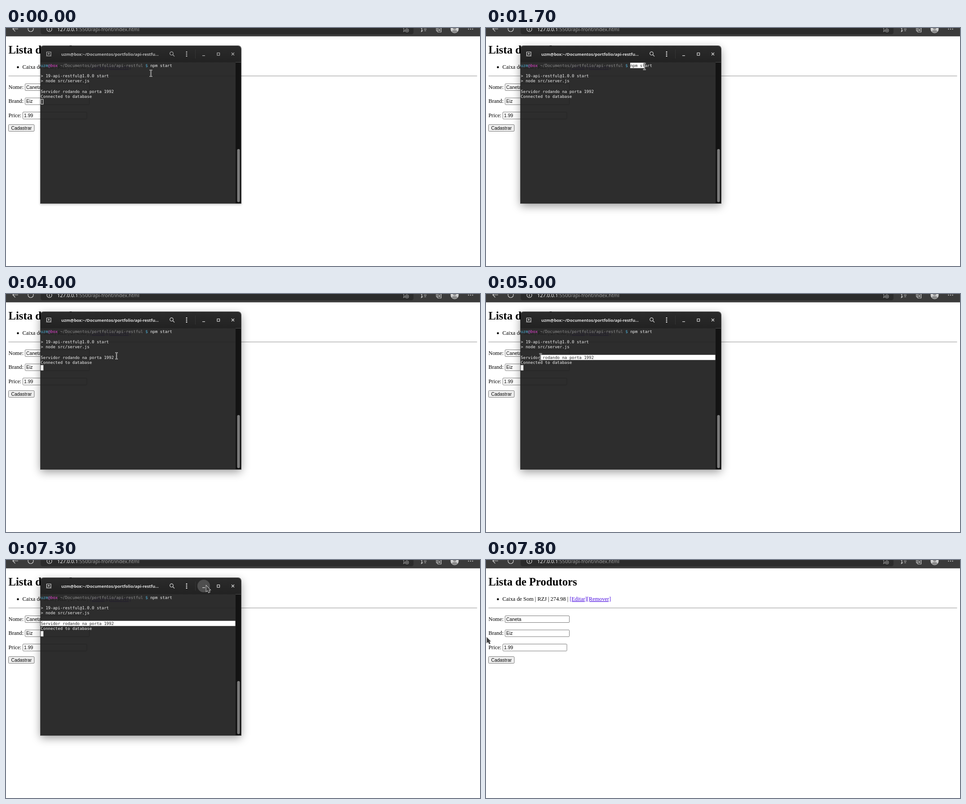
Animation, 1055 px wide and 531 px high, one loop 8000 ms. Source, as an HTML page:

```html
<!DOCTYPE html>
<html lang="pt">
<head>
<meta charset="utf-8">
<title>Terminal</title>
<style>
  html, body { margin: 0; width: 100%; height: 100%; overflow: hidden; background: #fff; }
  svg { display: block; position: absolute; left: 0; top: 0; }
  text { white-space: pre; }
  #stage { position: relative; width: 1055px; height: 531px; overflow: hidden; }
  .serif { font: 12.35px "Liberation Serif", serif; }
  .serif .h1 { font-size: 24.7px; font-weight: bold; }
  .sans { font: 10.4px "Liberation Sans", sans-serif; }
  .bar { font: 11px "Noto Sans", sans-serif; }
  .mono { font: 9px "DejaVu Sans Mono", monospace; fill: #f2f2f2; }
  .mono.dark { fill: #222; }
  .link { fill: #4a0be0; text-decoration: underline; }
  .line { fill: none; stroke: #d6d6d6; stroke-width: 1.2; }
  .field { fill: #fff; stroke: #767676; }
  #win {
    position: absolute; left: 77px; top: 40px; width: 446px; height: 351px;
    border-radius: 6px 6px 0 0; overflow: hidden; --ink: #b4b4b4;
    box-shadow: 0 0 0 1px rgba(0,0,0,.6), 0 2px 5px 1px rgba(0,0,0,.22);
  }
  #win.focus {
    --ink: #dedede;
    box-shadow: 0 0 0 1px rgba(0,0,0,.6), 0 6px 20px rgba(0,0,0,.4);
  }
  .title { font: bold 9.3px "Noto Sans", sans-serif; fill: var(--ink); text-anchor: middle; }
  .icon { fill: none; stroke: var(--ink); stroke-width: 1.2; }
  .dot { fill: var(--ink); }
</style>
</head>
<body>
<div id="stage">
  <svg width="1055" height="531">
    <rect width="1055" height="18.6" fill="#3b3b3b"/>
    <path d="M77 0H907V9Q907 14 902 14H82Q77 14 77 9Z" fill="#2b2b2b"/>
    <g class="line">
      <path d="M27 2H15M20.5 -3.5L15 2L20.5 7.5"/>
      <circle cx="55" cy="2" r="6"/>
      <circle cx="96.5" cy="2.5" r="5.5"/>
      <path d="M96.5 1V6"/>
      <g stroke="#999">
        <path d="M884 -1L886 3L885 8L889 5.5M891 0L895 -1M890.5 5.5H894.5M892.5 3.5V7.5"/>
        <circle cx="892.5" cy="5.5" r="3.5"/>
      </g>
      <path d="M923 -1L926 2L924.5 8L928 5.5M929 -1H936M930 2.5H936M931 6H935"/>
      <path d="M958 0V5Q958 7 960 7M961 0H968.5V9H961ZM964.7 2V7M962.2 4.5H967.2"/>
    </g>
    <circle cx="998.5" cy="2.5" r="9" fill="#d0d0d0"/>
    <g fill="#8a8a8a">
      <circle cx="998.5" cy="0" r="3.6"/>
      <path d="M992 8Q993 4.5 998.5 4.5Q1004 4.5 1005 8Q998.5 14 992 8Z"/>
    </g>
    <path d="M1029.5 2.5H1039" stroke="#e0e0e0" stroke-width="2.2" stroke-linecap="round" stroke-dasharray="0 4.5"/>
    <text class="bar" x="114" y="6.5" fill="#f4f4f4">127.0.0.1<tspan fill="#9c9c9c">:5500/api-front/index.html</tspan></text>

    <g class="serif">
      <text class="h1" x="5.5" y="57">Lista de Produtors</text>
      <circle cx="26.5" cy="87.5" r="2.2"/>
      <text x="36.5" y="91">Caixa de Som | RZJ | 274.98 | <tspan class="link">[Editar][Remover]</tspan></text>
      <text x="5.5" y="135.5">Nome:</text>
      <text x="5.5" y="167.2">Brand:</text>
      <text x="5.5" y="199">Price:</text>
    </g>
    <path d="M5.5 107H1048.5" stroke="#8c8c8c"/>
    <g class="field">
      <rect x="42.5" y="124.5" width="143" height="15" rx="1.5"/>
      <rect x="42.5" y="156" width="143" height="15" rx="1.5"/>
      <rect x="37.5" y="187.5" width="142.5" height="15.5" rx="1.5"/>
      <rect x="5.5" y="215.5" width="57.5" height="15" rx="2" fill="#efefef"/>
    </g>
    <g class="sans">
      <text x="45" y="135.5">Caneta</text>
      <text x="45" y="167.2">Eiz</text>
      <text x="40" y="199">1.99</text>
      <text x="11.5" y="227">Cadastrar</text>
    </g>
  </svg>

  <div id="win">
    <svg width="446" height="351" viewBox="77 40 446 351">
      <defs>
        <linearGradient id="head" x2="0" y2="1">
          <stop stop-color="#2b2b2b"/><stop offset="1" stop-color="#222"/>
        </linearGradient>
        <clipPath id="clip"><rect id="sel"/></clipPath>
      </defs>
      <rect x="77" y="76" width="434" height="316" fill="#1e1e1e" fill-opacity=".93"/>
      <rect x="77" y="40" width="447" height="36.5" fill="url(#head)"/>
      <path d="M421.5 48V68" stroke="#363636"/>
      <circle id="hover" cy="58" r="14"/>
      <text class="title" x="231.5" y="61.5">uzm@box:~/Documentos/portfolio/api-restfu...</text>
      <g class="icon">
        <path d="M92 60.5H90.5V53.5H100V60.5H98.5M95.2 55V60M92.7 57.5H97.7M89.5 62.3H101"/>
        <circle cx="368.5" cy="56.8" r="3.7"/>
        <path d="M371.2 59.5L375 63.3M437 61.7H443"/>
        <rect x="470" y="55.5" width="5.5" height="5.5"/>
        <path d="M502 55L508 61M508 55L502 61"/>
      </g>
      <g class="dot">
        <circle cx="402" cy="53.5" r="1.5"/><circle cx="402" cy="58" r="1.5"/><circle cx="402" cy="62.5" r="1.5"/>
      </g>
      <rect x="511" y="76.5" width="13" height="316" fill="#131313"/>
      <rect x="514.5" y="270" width="6" height="118.5" rx="3" fill="#7b7b7b"/>
      <g class="mono">
        <text x="77.3" y="86.5"><tspan fill="#4fb0d8">uzm</tspan><tspan fill="#b565c8">@</tspan><tspan fill="#e63fd0">box</tspan><tspan fill="#8d8d8d"> ~/Documentos/portfolio/api-restful</tspan><tspan fill="#4fb0d8"> $ </tspan>npm start</text>
        <text x="77.3" y="109.7">&gt; 19-api-restful@1.0.0 start</text>
        <text x="77.3" y="121.3">&gt; node src/server.js</text>
        <text x="77.3" y="144.5">Servidor rodando na porta 1992</text>
        <text x="77.3" y="156.1">Connected to database</text>
      </g>
      <g class="mono dark" clip-path="url(#clip)">
        <rect x="77" y="76" width="434" height="100" fill="#fff"/>
        <text x="321.2" y="86.5">npm start</text>
        <text x="77.3" y="144.5">Servidor rodando na porta 1992</text>
      </g>
      <rect id="caret" x="77.8" y="159" width="5" height="11" stroke="#f2f2f2"/>
    </svg>
  </div>

  <svg width="1055" height="531">
    <g id="beam" fill="none">
      <path d="M-3 -7H3M0 -7V7M-3 7H3" stroke="#f0f0f0" stroke-width="2.2"/>
      <path d="M-3 -7H3M0 -7V7M-3 7H3" stroke="#222" stroke-width=".8"/>
    </g>
    <path id="arrow" d="M.5 0V13.5L3.6 10.9L6 15.8L8.8 14.4L6.7 9.8H10Z" fill="#404040" stroke="#f4f4f4" stroke-width="1.4" paint-order="stroke"/>
  </svg>
</div>
<script>
  const LOOP = 8000, STEP = 100, CELL = 5.42, LEFT = 77.3;
  const FOCUS = 1100, ARROW = 6300, PRESS = 7300, CLOSE = 7500;
  const BUTTONS = [440, 472.5, 505];
  const $ = id => document.getElementById(id);

  // pointer strokes: start, end, goal x, goal y
  const START = [322.5, 101];
  const strokes = [
    [0, 400, 332, 80], [500, 700, 319.5, 88], [1200, 1900, 366, 85], [1900, 2100, 370, 83],
    [2800, 3000, 287, 136], [3100, 3300, 246, 138], [4100, 4800, 140, 144], [4800, 5300, 94, 135],
    [5400, 5500, 91, 130], [5900, 6100, 274, 78], [6200, 6400, 506, 56], [6500, 6600, 476, 57],
    [6700, 6900, 445, 57], [7400, 7500, 413, 277], [7600, 7800, 1, 172]
  ];

  const show = (el, on) => { el.style.display = on ? "" : "none"; };
  const set = (el, attrs) => { for (const k in attrs) el.setAttribute(k, attrs[k]); };
  const clamp = (v, lo, hi) => Math.max(lo, Math.min(hi, v));

  function pointer(t) {
    return strokes.reduce(([x, y], [from, to, gx, gy]) => {
      const p = clamp((t - from) / (to - from), 0, 1);
      return [x + (gx - x) * p, y + (gy - y) * p];
    }, START);
  }

  // a selection follows the pointer until the drag ends
  function selection(t) {
    if (t > 1200 && t < 4000) {
      const [x] = pointer(Math.min(t, 2100));
      return { x: 321, y: 77.5, width: clamp(Math.round((x - 321) / CELL), 0, 9) * CELL, height: 12 };
    }
    if (t >= 4200) {
      const [x, y] = pointer(Math.min(t, 5500));
      const from = y < 135.7 ? 77 : LEFT + Math.round((x - LEFT) / CELL) * CELL;
      return { x: from, y: 135.7, width: 510.5 - from, height: 11.6 };
    }
    return { width: 0, height: 0 };
  }

  function draw(t) {
    const [x, y] = pointer(t), arrow = t >= ARROW, focus = t >= FOCUS;
    show($("arrow"), arrow);
    show($("beam"), !arrow);
    set($(arrow ? "arrow" : "beam"), { transform: `translate(${x} ${y})` });

    show($("win"), t < CLOSE);
    $("win").classList.toggle("focus", focus);
    set($("sel"), selection(t));

    show($("caret"), !focus || Math.floor((t - 1095) / 602) % 2 === 0);
    set($("caret"), { fill: focus ? "#f2f2f2" : "none" });

    const button = arrow && y < 66 && BUTTONS.find(b => Math.abs(b - x) < 14);
    show($("hover"), button);
    if (button) set($("hover"), { cx: button, fill: t < PRESS ? "#3e3e3e" : "#4e4e4e" });
  }

  const start = performance.now();
  function tick() {
    const t = (performance.now() - start) % LOOP;
    draw(Math.floor(t / STEP) * STEP);
    requestAnimationFrame(tick);
  }
  tick();
</script>
</body>
</html>
```
